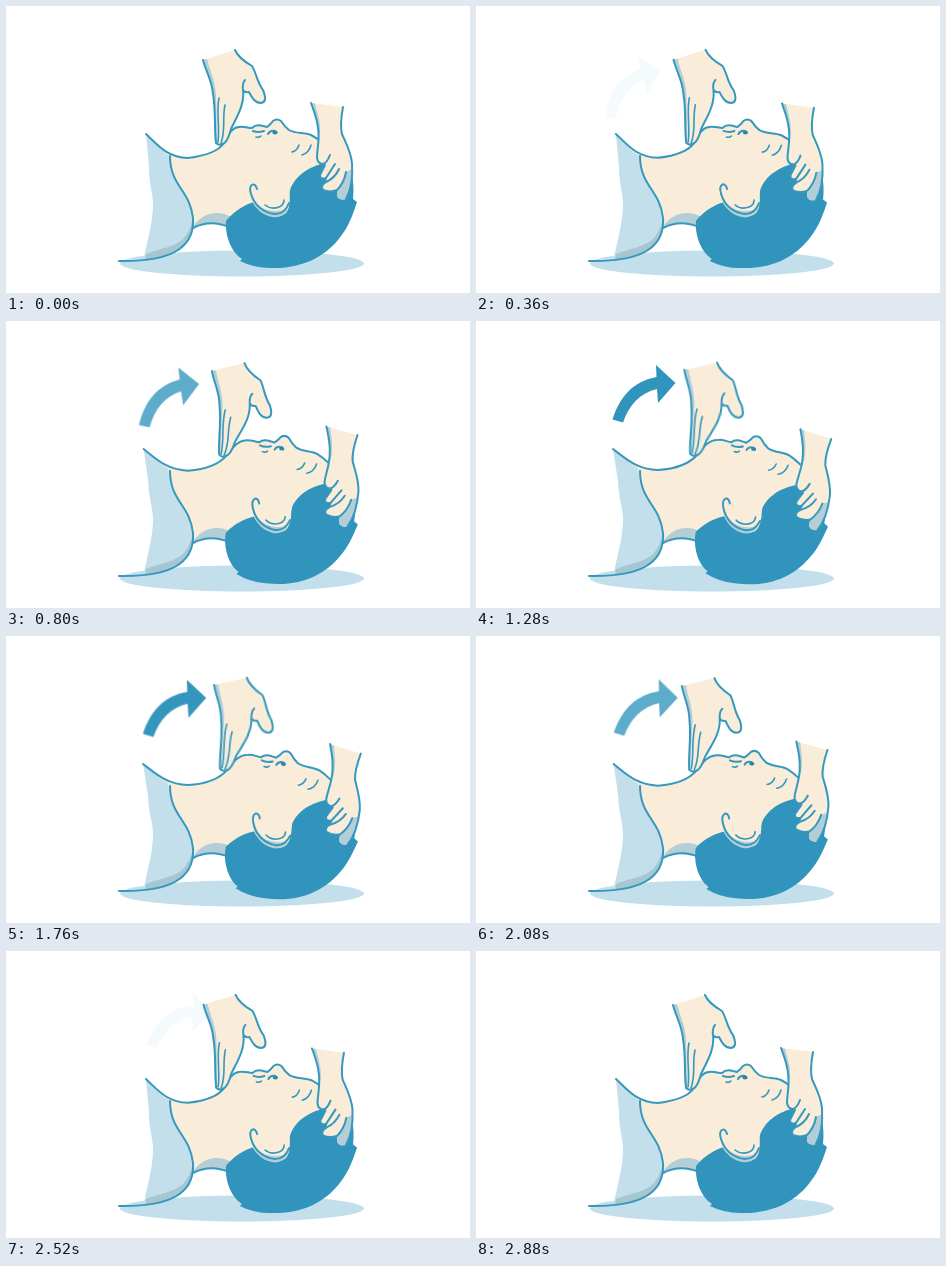
Recreate the animation shown at these times as an HTML page. Size 464 by 287 pixels, loop 2920 ms.

```html
<!DOCTYPE html>
<html lang="en">
<head>
<meta charset="utf-8">
<title>Head tilt, chin lift</title>
<style>
/* --tilt: 0 = resting pose, 1 = head tilted back */
@property --tilt { syntax: "<number>"; inherits: true; initial-value: 0; }

html, body { margin: 0; width: 100%; height: 100%; overflow: hidden; background: #fff; }
svg { display: block; width: 100%; height: 100%; }
svg, .neck, .neck-fill, .shirt {
  animation: tilt 2920ms cubic-bezier(.83, 0, .17, 1) infinite;
}
path { fill: none; stroke-linecap: round; stroke-linejoin: round; }
.line { stroke: #3598bf; stroke-width: 2; }
.thin { stroke: #3598bf; stroke-width: 1.6; }
.skin { fill: #f9ecd8; }
.hair, .arrow { fill: #3094bc; }
.cloth { fill: #c3dfeb; }
.shade { fill: #b3ced6; }
.fold { fill: #a6c6d1; }

.head { transform-origin: 258px 210px; transform: rotate(calc(var(--tilt) * 6deg)); }
.brow-hand { transform-origin: 253px 209px; transform: rotate(calc(var(--tilt) * 10.5deg)); }
.chin-hand {
  transform-origin: 214px 138px;
  transform: translate(calc(var(--tilt) * 4px), calc(var(--tilt) * -4px)) rotate(calc(var(--tilt) * 5deg));
}
.arrow { opacity: var(--tilt); transform-origin: 210px 148px; animation: sweep 2920ms linear infinite; }
.neck { animation-name: neck; }
.neck-fill { animation-name: neck-fill; }
.shirt { animation-name: shirt; }

@keyframes tilt {
  0%, 98.63%, 100% { --tilt: 0; }
  47.95%, 50.68% { --tilt: 1; }
}
@keyframes sweep {
  0% { transform: rotate(-12deg); }
  20.55% { transform: rotate(-8.6deg); }
  27.4% { transform: rotate(-4.3deg); }
  34% { transform: rotate(-1.2deg); }
  43.84% { transform: rotate(0deg); }
  65% { transform: rotate(.6deg); }
  71.23% { transform: rotate(1.5deg); }
  78.08% { transform: rotate(2.8deg); }
  100% { transform: rotate(6deg); }
}
@keyframes neck {
  0%, 98.63%, 100% { d: path("M140 128C152 139 160 151 182 152C198 150 212 146 218 137C222 128 227 121 233 121"); }
  47.95%, 50.68% { d: path("M137 128C149 137 160 148 182 149C199 148 213 143 221 134C227 126 233 119 241 119"); }
}
@keyframes neck-fill {
  0%, 98.63%, 100% { d: path("M140 128C152 139 160 151 182 152C198 150 212 146 218 137C222 128 227 121 233 121L270 200L224 221Q204 214 186 223L160 185Z"); }
  47.95%, 50.68% { d: path("M137 128C149 137 160 148 182 149C199 148 213 143 221 134C227 126 233 119 241 119L270 200L224 221Q204 214 186 223L160 185Z"); }
}
@keyframes shirt {
  0%, 98.63%, 100% { d: path("M140 128C148 135 155 146 164 150C164 180 184 184 187 212C188 242 165 253 138 254C138 246 147 220 147 198C147 186 143 180 143 160Z"); }
  47.95%, 50.68% { d: path("M137 128C146 135 153 143 162 147C164 178 184 184 187 212C188 242 165 253 138 254C138 246 147 220 147 198C147 186 143 180 142 160Z"); }
}
</style>
</head>
<body>
<svg viewBox="0 0 464 287" preserveAspectRatio="none">
  <ellipse class="cloth" cx="236" cy="257.500" rx="122" ry="13"/>

  <path class="arrow" d="M136.500 98.500C144 75 158 60 180.500 56L180 44L199.500 62L182 82L181 68C164 72 153 84 147 101.500Z"/>

  <g>
    <path class="skin neck-fill" d="M140 128C152 139 160 151 182 152C198 150 212 146 218 137C222 128 227 121 233 121L270 200L224 221Q204 214 186 223L160 185Z"/>
    <path class="shade" d="M187 221C192 212 202 206 213 207Q222 208 228 213L224 221Q204 214 187 222Z"/>
    <path class="line" d="M187 222Q204 213 223 221"/>
    <path class="cloth shirt" d="M140 128C148 135 155 146 164 150C164 180 184 184 187 212C188 242 165 253 138 254C138 246 147 220 147 198C147 186 143 180 143 160Z"/>
    <path class="fold" d="M140 248C154 242 167 242 177 233Q184 226 187 212C188 242 165 253 139 254Z"/>
    <path class="line" d="M164 150C164 180 184 184 187 212C189 243 163 256 113 255"/>
    <path class="line neck" d="M140 128C152 139 160 151 182 152C198 150 212 146 218 137C222 128 227 121 233 121"/>
  </g>

  <g class="head">
    <path class="skin" d="M233 121C238 120 242 122 246 122Q250 118 257 120L261 121Q265 118 267 115Q271 112 275 115C277 118 279 121 283 124C290 128 298 126 305 129Q311 132 317 137L320 160L288 190L250 208L226 216Z"/>
    <path class="line" d="M233 121C238 120 242 122 246 122Q250 118 257 120L261 121Q265 118 267 115Q271 112 275 115C277 118 279 121 283 124C290 128 298 126 305 129Q311 132 317 137"/>
    <path class="line" d="M247 125Q252 127 258 125M262 128Q264 124 269 125"/>
    <path class="thin" d="M250 131Q253 132 255 130M286 146Q291 145 293 139M296 149Q303 147 305 139"/>
    <ellipse cx="269" cy="126.500" rx="2.600" ry="1.900" fill="#2c86ad"/>
    <path class="hair" d="M318 157C304 161 290 168 284 184L281 204Q268 212 254 205L248 196C238 199 228 205 220 215C219 227 223 241 232 250L236 253L234 255Q248 262 264 262C300 263 322 248 335 230C343 220 347 208 351 196L347 193C349 175 345 160 338 150Z"/>
    <path class="skin" d="M249 177C241 178 243 191 249 200C257 210 272 214 280 207C285 201 284 190 283 183L268 168Z"/>
    <path class="shade" d="M245 190C252 203 264 208 282 203Q276 213 266 211C256 209 248 202 245 190Z"/>
    <path class="line" d="M251 183C249 175 242 178 245 188C249 201 259 207 269 208Q279 208 283 197"/>
    <path class="thin" d="M259 199Q265 204 273 201Q278 199 278 194"/>
  </g>

  <g class="brow-hand">
    <path class="skin" d="M305 97L337 101C335 112 334 120 336 128C340 137 345 146 346 157C347 172 345 184 340 193Q333 195 331 190L331 184Q324 187 317 184Q314 180 320 176L321 172Q314 174 314 169L319 159Q312 158 311 152C311 142 314 134 312 122C311 112 308 105 305 97Z"/>
    <path class="shade" d="M305 97L309 97.500C311 107 315 114 314 130L312 122C311 112 308 105 305 97ZM331 185Q339 178 340 166L346 163C347 175 344 185 340 193Q333 195 331 190Z"/>
    <path class="line" d="M337 101C335 112 334 120 336 128C340 137 345 146 346 157C347 172 345 184 340 193M305 97C308 105 311 112 312 122C314 134 311 142 311 152Q312 158 317 158Q321 157 324 149M319 159L314 169Q314 174 320 172L329 158M320 176Q314 180 317 184Q324 187 331 184Q338 177 340 166M320 176Q329 172 333 163"/>
  </g>

  <g class="chin-hand">
    <path class="skin" d="M197 54L229 44C232 51 239 56 246 60C250 66 251 76 257 84Q262 96 255 97C249 97 246 92 243 86L237 84C239 99 230 112 225 123Q221 138 216 138Q213 140 210 137C208 120 210 105 207 88C206 74 200 66 197 54Z"/>
    <path class="shade" d="M197 54L201 53C204 65 209 74 210 88L211 137L210 137C208 120 210 105 207 88C206 74 200 66 197 54Z"/>
    <path class="line" d="M229 44C232 51 239 56 246 60C250 66 251 76 257 84Q262 96 255 97C249 97 246 92 243 86Q239 87 237 84M237 84C239 99 230 112 225 123Q221 138 216 138Q213 140 210 137C208 120 210 105 207 88C206 74 200 66 197 54M237 84Q236 77 239 74"/>
    <path class="thin" d="M213 92C210 106 214 120 212 136M219 99C216 113 220 124 215 137"/>
  </g>
</svg>
</body>
</html>
```
